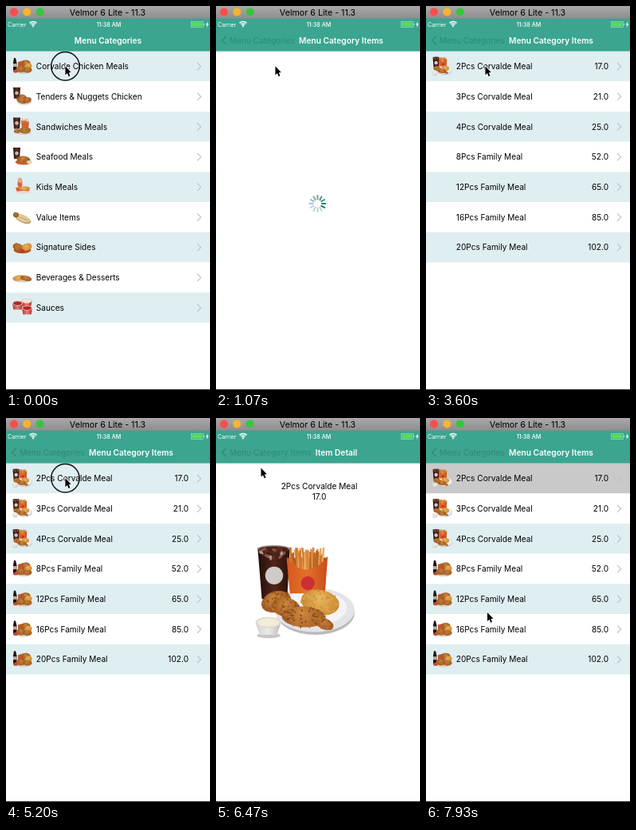
Write an HTML page with a canvas that moves like this. It is 256x480 px and loops after 8000 ms.

```html
<!DOCTYPE html>
<html lang="en">
<head>
<meta charset="utf-8">
<title>Menu app</title>
<style>
html, body { margin: 0; width: 100%; height: 100%; overflow: hidden; background: #fff; }
canvas { display: block; width: 256px; height: 480px; }
</style>
</head>
<body>
<canvas id="stage"></canvas>
<script>
const LOOP = 8000, W = 256, H = 480, TOP = 56.6, ROW = 37.7;
const TEAL = '#3ba58f', BACK = '#2c8c77';
const canvas = document.getElementById('stage');
const ctx = canvas.getContext('2d');
const ratio = Math.max(1, window.devicePixelRatio || 1);
canvas.width = W * ratio;
canvas.height = H * ratio;

const clamp = v => Math.max(0, Math.min(1, v));
const lerp = (a, b, k) => a + (b - a) * k;
const ease = v => { const k = clamp(v); return k * k * (3 - 2 * k); };
const spring = ms => {
  if (ms <= 0) return 0;
  const u = ms * 0.018;
  return u > 8 ? 1 : 1 - (1 + u) * Math.exp(-u);
};

function random(seed) {
  return () => (seed = (seed * 16807) % 2147483647) / 2147483647;
}

function text(str, x, y, { size = 10.1, weight = 400, color = '#000', align = 'left' } = {}) {
  ctx.font = `${weight} ${size}px Inter, "Liberation Sans", sans-serif`;
  ctx.fillStyle = color;
  ctx.textAlign = align;
  ctx.textBaseline = 'alphabetic';
  ctx.fillText(str, x, y);
}

function rect(x, y, w, h, color) {
  ctx.fillStyle = color;
  ctx.fillRect(x, y, w, h);
}

function oval(x, y, rx, ry, color, turn = 0) {
  ctx.beginPath();
  ctx.ellipse(x, y, rx, ry, turn, 0, 7);
  ctx.fillStyle = color;
  ctx.fill();
}

function poly(points, color) {
  ctx.beginPath();
  points.forEach(([x, y]) => ctx.lineTo(x, y));
  ctx.closePath();
  ctx.fillStyle = color;
  ctx.fill();
}

function line(points, color, width) {
  ctx.beginPath();
  points.forEach(([x, y]) => ctx.lineTo(x, y));
  ctx.strokeStyle = color;
  ctx.lineWidth = width;
  ctx.stroke();
}

function placed(x, y, scale, draw) {
  ctx.save();
  ctx.translate(x, y);
  ctx.scale(scale, scale);
  draw();
  ctx.restore();
}

function across(x0, x1, ...colors) {
  const g = ctx.createLinearGradient(x0, 0, x1, 0);
  colors.forEach((c, i) => g.addColorStop(i / (colors.length - 1), c));
  return g;
}

const FRIED = ['#d08a3f', '#9a5520', '#c57a33', '#87461a'];
const GOLDEN = ['#e9b95f', '#c98630', '#e2a94e', '#d0923c'];

// Speckled food lump, lit from above; colors are light, shade and two speckles
function crust(x, y, rx, ry, turn = 0, [light, shade, ...spots] = FRIED) {
  const next = random(Math.round(x * 31 + y * 7 + 11));
  ctx.save();
  ctx.translate(x, y);
  ctx.rotate(turn);
  const glow = ctx.createRadialGradient(-rx * 0.1, -ry * 0.4, 0, 0, 0, rx);
  glow.addColorStop(0, light);
  glow.addColorStop(1, shade);
  oval(0, 0, rx, ry, glow);
  for (let i = 0; i < 60; i++) {
    const a = next() * 6.28, r = Math.sqrt(next());
    oval(Math.cos(a) * r * rx, Math.sin(a) * r * ry, rx * 0.06, ry * 0.07, spots[i % 2], a);
  }
  ctx.restore();
}

function fries(x, y, w, h, count) {
  const next = random(91);
  for (let i = 0; i < count; i++) {
    const k = next(), sx = x + k * w, sy = y + next() * h * 0.4;
    line([[sx, sy], [lerp(sx, x + w / 2, 0.2) + (next() - 0.5) * w * 0.15, y + h]],
      ['#d98a42', '#b9641f', '#e8a65c', '#cc7830'][i % 4], w * 0.055);
  }
}

// Meal photo in a 144 x 138 box
function meal() {
  oval(87, 100, 57, 32, '#b9b9be');
  oval(86, 96, 58, 32, '#e3e4e8');
  oval(84, 93, 49, 25, '#f3f3f5');
  poly([[3, 6], [50, 6], [46, 79], [9, 79]], across(3, 50, '#230d0a', '#52251a', '#2b110c'));
  oval(27.5, 79, 18.5, 4, '#24100c');
  oval(26.5, 7, 23.5, 5, '#a48d84');
  oval(26.5, 8, 21.5, 4.2, '#4a2117');
  const ice = random(17);
  for (let i = 0; i < 16; i++) oval(8 + ice() * 37, 7 + ice() * 14, 3.5, 2, ['#86564a', '#5f3023', '#b39488'][i % 3], ice() * 3);
  oval(27, 46, 13, 13, '#d0cbc8');
  poly([[46, 20], [104, 20], [101, 66], [50, 66]], '#b04c18');
  fries(50, 5, 50, 42, 70);
  ctx.beginPath();
  ctx.moveTo(45, 20);
  ctx.quadraticCurveTo(75, 56, 105, 18);
  ctx.lineTo(101, 72);
  ctx.lineTo(50, 72);
  ctx.fillStyle = across(45, 105, '#d85a1c', '#e2702a', '#c94c1a');
  ctx.fill();
  oval(76, 57, 10, 10, '#cc2f33');
  crust(94, 85, 28, 18, 0.2, GOLDEN);
  crust(30, 84, 22, 15, -0.3);
  crust(44, 92, 21, 14, 0.2);
  crust(100, 116, 14, 8, 0.4);
  crust(70, 106, 32, 15, 0.05);
  oval(19, 133, 17, 4, '#c6c6c8');
  poly([[0, 115], [37, 115], [31, 132], [6, 132]], across(0, 37, '#d6d3cd', '#eceae6', '#bfbcb7'));
  oval(18.5, 114, 18.5, 8, '#dedbd5');
  oval(18.5, 114, 15.5, 6, '#f3ecd9');
}

// Small pictures in a 25 x 24 box
function cup() {
  poly([[1, 1], [10, 1], [9, 15], [2, 15]], across(1, 10, '#2a110d', '#5b3126', '#2a110d'));
  oval(5.5, 8, 2.3, 2.3, '#c4b8b2');
}
function family() {
  poly([[2, 2], [4, 2], [5.5, 8], [5.5, 18], [1, 18], [1, 8]], '#21110e');
  rect(1, 9, 4.5, 4, '#b7aaa4');
  poly([[7, 7], [15, 5], [16, 13], [7, 14]], '#b9582a');
  crust(17, 8, 5.5, 3.5);
  crust(20, 12, 4.5, 4, 0, GOLDEN);
  oval(14, 18, 10.5, 4, '#d9cbbd');
  crust(11, 16, 6, 4);
  crust(19, 17, 5.5, 3.4);
  oval(4, 18.5, 3, 2, '#c04a30');
}
function tenders() {
  cup();
  oval(15, 19, 9, 4, '#d9d0c6');
  crust(13, 13, 5, 3, 0.3);
  crust(12, 17, 7, 4, 0.3);
  crust(19, 17, 5, 3.5, -0.3);
}
function sandwich() {
  cup();
  poly([[11, 5], [21, 6], [20, 15], [12, 15]], '#d2612a');
  fries(11, 2, 9, 6, 12);
  oval(14, 20, 10, 2.5, '#d9d0c6');
  crust(16, 17, 7, 4);
  rect(10, 17, 13, 1.3, '#8a8a3c');
  crust(6, 18, 4, 2.5);
}
function seafood() {
  cup();
  oval(14, 19, 10.5, 3.5, '#c9602a');
  crust(14, 16, 8.5, 4.5, 0.1);
  oval(21, 19, 3, 2, '#e6d8c4');
}
function kids() {
  oval(9.5, 8, 3, 6, '#d9653c');
  oval(9.5, 4, 2.6, 3, '#e8a27a');
  line([[6, 2], [13, 9]], '#e9c0a0', 1);
  poly([[4, 13], [22, 14], [20, 19], [6, 19]], '#dc5a34');
  crust(15, 14, 7, 2.6, 0, GOLDEN);
  oval(14, 19, 9.5, 1.8, '#eadccd');
}
function wrap() {
  oval(13, 14.5, 11, 4.6, '#b99660', 0.42);
  oval(12.5, 13.5, 10.5, 4, '#e2cb98', 0.42);
  crust(4.5, 9.5, 3.6, 3.2, 0.3, ['#c88637', '#7d5527', '#7f9a43', '#9a4f22']);
  line([[9, 12], [20, 17]], '#c9a868', 1.2);
}
function sides() {
  oval(12.5, 15.5, 11, 4.5, '#b8501f');
  crust(7, 12, 6.5, 4.5, 0.3);
  crust(18, 12, 6.5, 4.5, -0.3, GOLDEN);
  oval(12.5, 17, 2.8, 2.3, '#c43a2c');
}
function dessert() {
  oval(12.5, 14.5, 12, 4, '#dccfc0');
  crust(8, 13, 7.5, 3.5, -0.15, GOLDEN);
  crust(17, 13.5, 7, 3.3, 0.25);
}
function sauces() {
  const pot = (x, y, color) => {
    poly([[x - 6.5, y], [x + 6.5, y], [x + 5.2, y + 8], [x - 5.2, y + 8]], across(x - 6, x + 6, '#b93434', '#dd8078', '#b02e2e'));
    oval(x, y, 6.5, 3.2, '#e6cbc2');
    oval(x, y, 5.3, 2.3, color);
  };
  pot(18, 4, '#efe6d4');
  pot(6.5, 7, '#a82a22');
  pot(18.5, 13, '#b8241f');
}

const categories = [
  ['Corvalde Chicken Meals', family], ['Tenders & Nuggets Chicken', tenders],
  ['Sandwiches Meals', sandwich], ['Seafood Meals', seafood], ['Kids Meals', kids],
  ['Value Items', wrap], ['Signature Sides', sides], ['Beverages & Desserts', dessert], ['Sauces', sauces]
].map(([name, icon]) => ({ name, icon }));

const smallMeal = () => placed(0, 0, 25 / 144, meal);
const items = [
  ['2Pcs Corvalde Meal', '17.0', 3600], ['3Pcs Corvalde Meal', '21.0', 4400],
  ['4Pcs Corvalde Meal', '25.0', 4400], ['8Pcs Family Meal', '52.0', 4400],
  ['12Pcs Family Meal', '65.0', 3870], ['16Pcs Family Meal', '85.0', 4130],
  ['20Pcs Family Meal', '102.0', 4470]
].map(([name, price, loaded], i) => ({ name, price, loaded, icon: i < 3 ? smallMeal : family }));

function table(rows, t, selectedAt) {
  rows.forEach(({ name, price, loaded = 0, icon }, i) => {
    const y = TOP + i * ROW, mid = y + ROW / 2;
    const picked = i === 0 && t >= selectedAt;
    rect(0, y, W, ROW, picked ? '#c9c9c9' : i % 2 ? '#fff' : '#dfeef1');
    if (t >= loaded) placed(8, y + 6.4, 1, icon);
    text(name, 37.8, mid + 3.8);
    if (price) text(price, 229, mid + 3.8, { align: 'right' });
    line([[240, mid - 4.6], [244.6, mid + 0.1], [240, mid + 4.8]], '#bfc3c7', 1.2);
  });
}

function spinner(t) {
  const head = 4 + Math.floor((Math.min(t, 1400) - 1070) / 83);
  ctx.lineCap = 'round';
  for (let i = 0; i < 12; i++) {
    const age = (((head - i) % 12) + 12) % 12;
    const k = clamp(age / 8), a = i * Math.PI / 6;
    const color = `rgb(${lerp(28, 190, k)},${lerp(118, 207, k)},${lerp(98, 212, k)})`;
    const at = r => [127.5 + Math.sin(a) * r, 247 - Math.cos(a) * r];
    line([at(5.6), at(10)], color, 2);
  }
  ctx.lineCap = 'butt';
}

function detail(t) {
  const k = ease((t - 5730) / 1000);
  placed(lerp(8, 58, k), lerp(63, 176, k), lerp(25, 144, k) / 144, meal);
  text(items[0].name, 129.5, 89.4, { align: 'center' });
  text(items[0].price, 129.5, 101.8, { align: 'center' });
}

const pages = [
  { title: 'Menu Categories', center: 128, draw: t => table(categories, t, 70) },
  { title: 'Menu Category Items', center: 157, back: 'Menu Categories', backCenter: 58,
    draw: t => t < 1530 ? spinner(t) : table(items, t, 5330) },
  { title: 'Item Detail', center: 151, back: 'Menu Category Items', backCenter: 68.5, draw: detail }
];

function drawPage(page, offset, t) {
  ctx.save();
  ctx.translate(offset * (offset > 0 ? W : 77), 0);
  if (offset > 0) {
    ctx.shadowColor = 'rgba(0,0,0,.4)';
    ctx.shadowBlur = 7 * ratio;
  }
  rect(0, TOP, W, H, '#fff');
  ctx.shadowColor = 'transparent';
  page.draw(t);
  if (offset < 0) rect(0, TOP, W, H, `rgba(0,0,0,${-0.11 * offset})`);
  ctx.restore();
}

function drawNav(position) {
  rect(0, 15, W, TOP - 15, TEAL);
  pages.forEach((page, i) => {
    const offset = i - position, far = Math.abs(offset);
    if (far >= 1) return;
    const target = offset > 0 ? W : pages[i + 1]?.backCenter ?? 0;
    ctx.globalAlpha = clamp(1.3 - 1.6 * far);
    text(page.title, lerp(page.center, target, far), 46.8, { size: 10.2, weight: 600, color: '#fff', align: 'center' });
    if (page.back) {
      ctx.globalAlpha = clamp(1 - 12 * far);
      text(page.back, 17 - offset * 40, 46.8, { color: BACK });
      ctx.globalAlpha = clamp(1 - 7 * far);
      line([[12.6, 38], [7.6, 43], [12.6, 48]], BACK, 1.5);
    }
    ctx.globalAlpha = 1;
  });
}

function drawChrome() {
  const metal = ctx.createLinearGradient(0, 0, 0, 16);
  metal.addColorStop(0, '#aaa8aa');
  metal.addColorStop(1, '#8e8c8e');
  rect(0, 0, W, 15.7, metal);
  ['#fb4d4a', '#f8b42e', '#37c53f'].forEach((color, i) => oval(10 + i * 16.3, 7.4, 5, 5, color));
  text('Velmor 6 Lite - 11.3', 127.5, 11.5, { size: 10.7, align: 'center' });

  const white = { size: 7.2, color: '#fff' };
  text('Carrier', 2, 25.6, white);
  text('11:38 AM', 129, 25.6, { ...white, weight: 500, align: 'center' });
  ctx.lineWidth = 1.3;
  ctx.strokeStyle = '#fff';
  for (const r of [2.6, 4.7, 6.6]) {
    ctx.beginPath();
    ctx.arc(34, 26, r, -2.35, -0.79);
    ctx.stroke();
  }
  oval(34, 25.4, 1, 1, '#fff');
  ctx.strokeStyle = '#a5d9c8';
  ctx.lineWidth = 0.7;
  ctx.strokeRect(232.3, 19.4, 15, 7.2);
  rect(233.3, 20.4, 13, 5.2, '#55df5c');
  rect(248, 21.7, 1, 2.6, '#a5d9c8');
  poly([[253.4, 19.5], [250.6, 23.6], [252.4, 23.6], [251.5, 27], [254.6, 22.5], [252.8, 22.5]], '#fff');
  rect(0, 479, W, 1, '#333');
}

function drawCursor(t) {
  const toBack = ease((t - 6150) / 720), away = ease((t - 7680) / 250);
  const x = lerp(lerp(74.4, 31.6, toBack), 77, away);
  const y = lerp(lerp(75.2, 45, toBack), 243, away);
  if (t < 70 || (t >= 5200 && t < 5330) || (t >= 7000 && t < 7130)) {
    ctx.beginPath();
    ctx.arc(x, y, 17.7, 0, 7);
    ctx.strokeStyle = '#111';
    ctx.lineWidth = 1.5;
    ctx.stroke();
  }
  placed(x, y, 1, () => {
    const arrow = [[0, 0], [0, 11], [2.5, 8.8], [4.2, 12.8], [6, 12], [4.4, 8], [7.4, 7.8], [0, 0], [0, 2]];
    line(arrow, '#fff', 1.6);
    poly(arrow, '#000');
  });
}

function render(t) {
  ctx.setTransform(ratio, 0, 0, ratio, 0, 0);
  rect(0, 0, W, H, '#fff');
  // 0 = categories, 1 = items, 2 = detail; fractions are slides in progress
  const position = spring(t - 570) + spring(t - 5345) - spring(t - 7244);
  pages.forEach((page, i) => {
    if (Math.abs(i - position) < 1) drawPage(page, i - position, t);
  });
  drawNav(position);
  drawChrome();
  drawCursor(t);
}

function tick() {
  render(performance.now() % LOOP);
  requestAnimationFrame(tick);
}
tick();
</script>
</body>
</html>
```
